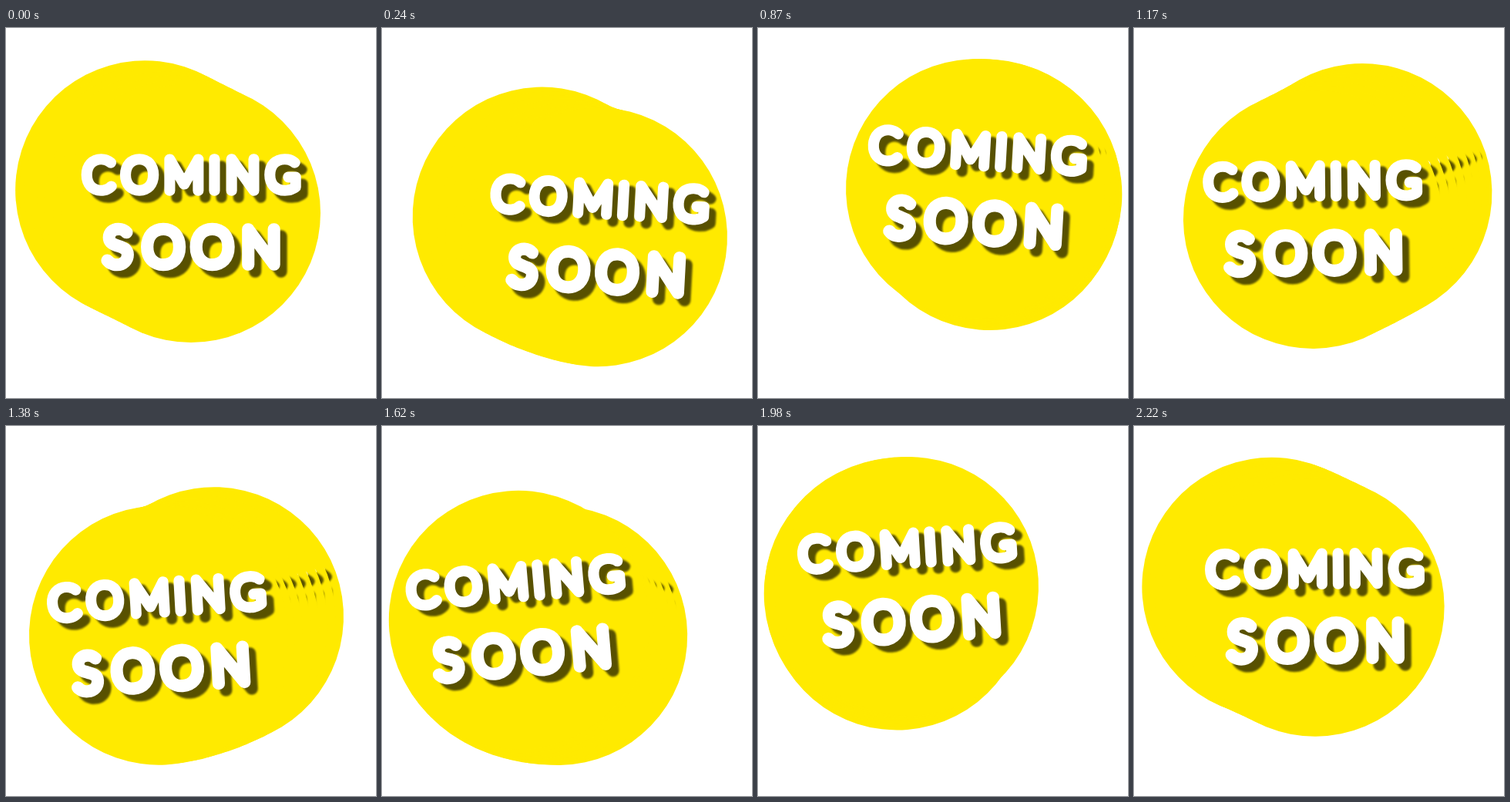
An HTML page that plays this animation: 480x480 px, repeating every 2250 ms.

```html
<!DOCTYPE html>
<html lang="en">
<head>
<meta charset="utf-8">
<title>Coming soon</title>
<style>
  @property --t { syntax: "<angle>"; inherits: true; initial-value: 0deg; }
  html, body { margin: 0; width: 100%; height: 100%; overflow: hidden; background: #fff; }
  svg { display: block; width: 100%; height: 100%; animation: turn 2250ms steps(75) infinite; }
  @keyframes turn { from { --t: 0deg; } to { --t: 360deg; } }

  /* Each badge runs the same figure of eight, a little behind the one above it. */
  .badge {
    --lag: calc(var(--i) * 9.8deg);
    --swing: sin(var(--t) - var(--lag));
    transform-origin: 240px 240px;
    transform:
      translate(calc(64.3px * var(--swing)), calc(32px * sin(2 * var(--t) - var(--lag))))
      rotate(calc(5deg * var(--swing)));
  }
  text {
    font-family: Lato, "Open Sans", sans-serif;
    font-weight: 100;
    text-anchor: middle;
    stroke-linejoin: round;
  }
  .top { font-size: 57px; stroke-width: 13.5px; }
  .low { font-size: 66px; stroke-width: 15.5px; }
  .face { fill: #fff; stroke: #fff; }
  .shade { fill: #000; stroke: #000; opacity: .65; }
</style>
</head>
<body>
<svg viewBox="0 0 480 480">
  <defs>
    <filter id="soft" x="-10%" y="-10%" width="120%" height="120%"><feGaussianBlur stdDeviation="1"/></filter>
    <g id="words">
      <text class="top" x="120 173 231 270.5 307 359" y="210.5">COMING</text>
      <text class="low" x="145 204 267.5 331" y="307">SOON</text>
    </g>
    <g id="badge">
      <circle cx="240" cy="240" r="168" fill="#ffea00"/>
      <g class="shade" filter="url(#soft)"><use href="#words" x="9" y="9"/></g>
      <use class="face" href="#words"/>
    </g>
  </defs>
  <use class="badge" href="#badge" style="--i:7"/>
  <use class="badge" href="#badge" style="--i:6"/>
  <use class="badge" href="#badge" style="--i:5"/>
  <use class="badge" href="#badge" style="--i:4"/>
  <use class="badge" href="#badge" style="--i:3"/>
  <use class="badge" href="#badge" style="--i:2"/>
  <use class="badge" href="#badge" style="--i:1"/>
  <use class="badge" href="#badge" style="--i:0"/>
</svg>
</body>
</html>
```
